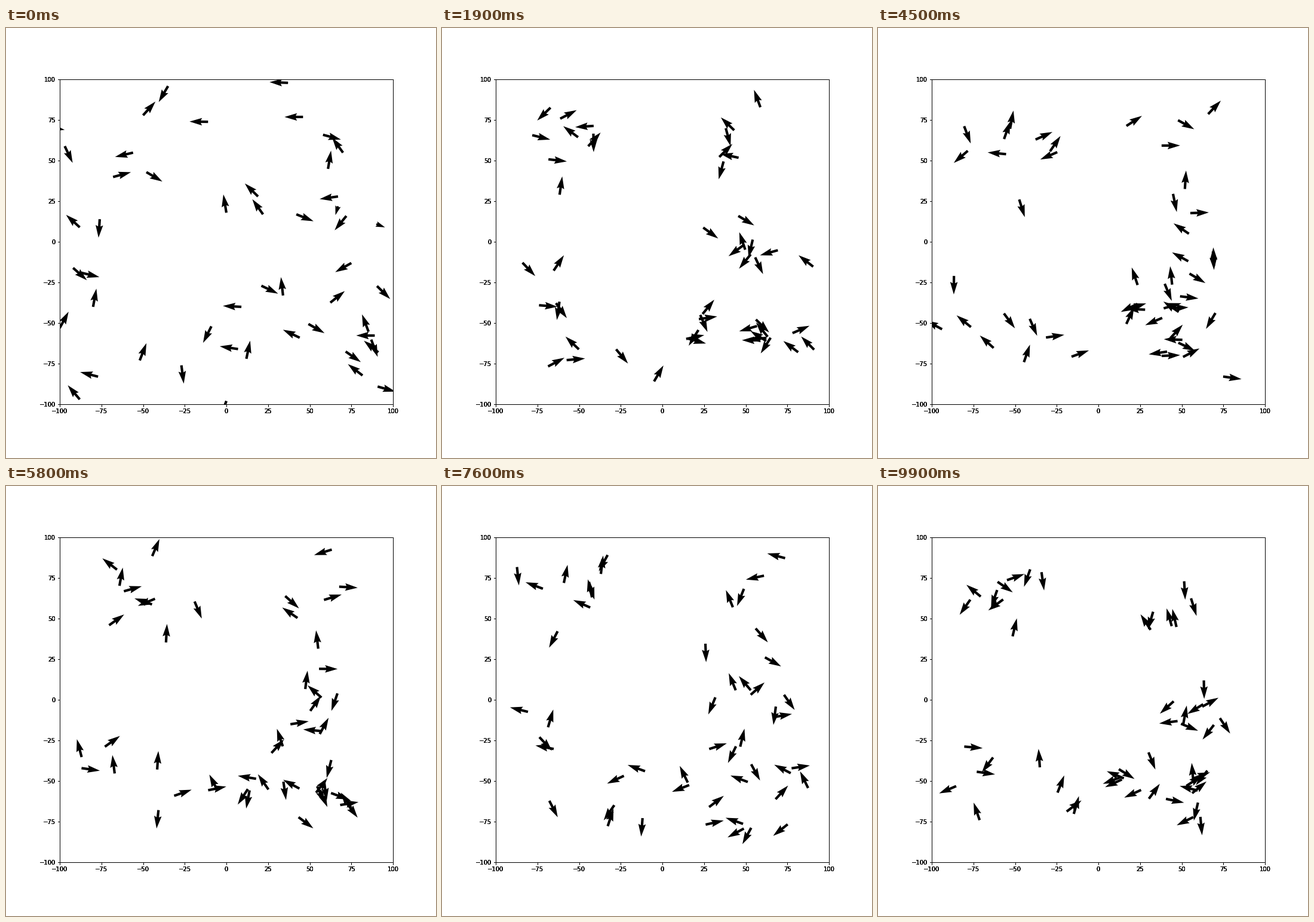
These frames come from a looping animation (720 px wide and 720 px high, 10 s). A matplotlib script:

```python
import matplotlib.pyplot as plt
import numpy as np
from matplotlib.animation import FuncAnimation

FRAMES, INTERVAL = 100, 100
SPEED, PULL, MAX_TURN, WANDER = 1.6, 0.012, 0.4, 0.07

# starting points of the scattered birds; the first two are slow
SCATTER = [
    (67, 22), (90, 11), (-35, 96), (-50, 78), (-11, 74), (37, 98), (46, 77), (58, 66),
    (70, 55), (61, 45), (67, 28), (72, 16), (42, 17), (75, -13), (34, -33), (21, -27),
    (9, -40), (-9, -52), (7, -66), (12, -72), (0, -98), (-27, -76), (-52, -73), (-77, -83),
    (-88, -97), (-100, -53), (-80, -40), (-87, -19), (-92, -16), (-88, 9), (-76, 14), (-68, 40),
    (-48, 43), (-56, 55), (-97, 59), (0, 18), (19, 28), (22, 17), (-108, 71), (44, -59),
]
# centres that the flocks circle round; one of them drifts
HOMES = [(-58, 60), (-80, -36), (-45, -76), (19, -55), (58, -56), (60, -1), (52, 56)]
DRIFT = (27, 18)


def fly():
    """Yield tail positions and velocities, frame by frame."""
    rng = np.random.default_rng(4)
    crowd = rng.uniform((40, -95), (92, -22), (10, 2))
    pos = np.vstack([SCATTER, crowd])
    angle = rng.uniform(0, 2 * np.pi, len(pos))
    vel = np.column_stack([np.cos(angle), np.sin(angle)])
    vel[:2] /= 2
    homes = np.array(HOMES, float)
    flock = np.linalg.norm(pos[:, None] - homes, axis=2).argmin(axis=1)
    offset = rng.normal(0, 8, pos.shape)
    for _ in range(FRAMES):
        yield pos.copy(), vel.copy()
        steer = PULL * (homes[flock] + offset - pos)
        size = np.linalg.norm(steer, axis=1, keepdims=True)
        steer *= np.minimum(1, MAX_TURN / size)
        vel += steer + rng.normal(0, WANDER, pos.shape)
        vel /= np.linalg.norm(vel, axis=1, keepdims=True)
        pos += SPEED * vel
        homes[2] += np.array(DRIFT) / FRAMES


def add_axes():
    ax = fig.add_axes([0.125, 0.125, 0.775, 0.755], facecolor="none")
    ticks = range(-100, 101, 25)
    ax.set(xlim=(-100, 100), ylim=(-100, 100), xticks=ticks, yticks=ticks)
    return ax


plt.rcParams.update({"font.family": "DejaVu Sans", "font.size": 10})
fig = plt.figure(figsize=(10, 10), dpi=72, facecolor="white")
# stacked axes give the heavy tick labels
ax = [add_axes() for _ in range(4)][0]

states = list(fly())
birds = ax.quiver(*states[0][0].T, *states[0][1].T, scale=18)


def update(i):
    pos, vel = states[i]
    birds.set_offsets(pos)
    birds.set_UVC(*vel.T)
    return [birds]


anim = FuncAnimation(fig, update, frames=FRAMES, interval=INTERVAL, repeat=True, repeat_delay=0)
plt.show()
```
